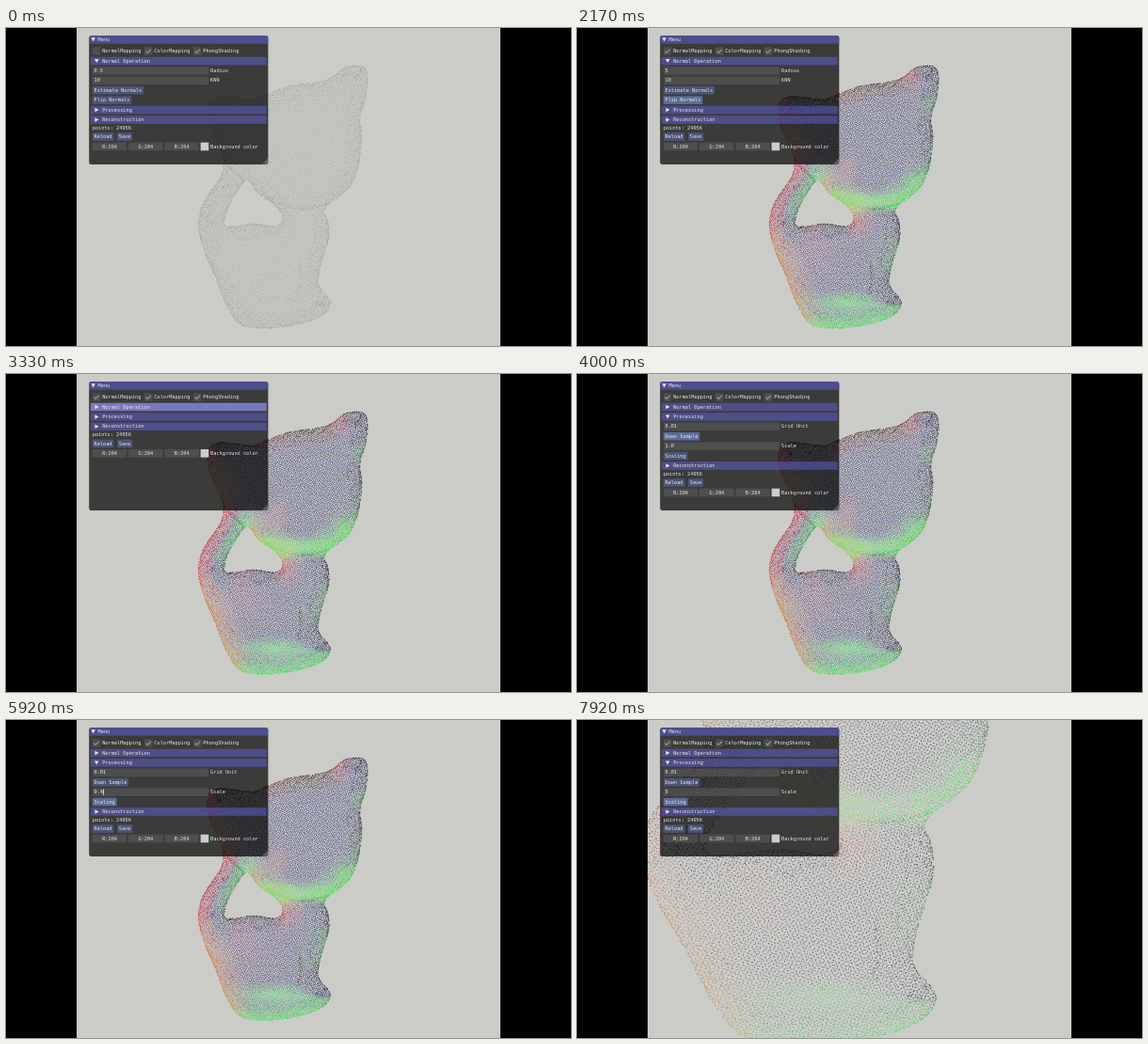
Animation, 600 px wide and 338 px high, one loop 8000 ms. Source, as an HTML page with a canvas:

```html
<!DOCTYPE html>
<html lang="en">
<head>
<meta charset="utf-8">
<title>Point cloud viewer</title>
<style>
html, body { margin: 0; width: 100%; height: 100%; overflow: hidden; background: #000; }
canvas { display: block; }
</style>
</head>
<body>
<canvas id="stage" width="600" height="338"></canvas>
<script>
const LOOP = 8000, WIDTH = 600, HEIGHT = 338;
const ctx = document.getElementById('stage').getContext('2d');

let seed = 7;
function random() {
  seed = (seed + 0x6D2B79F5) | 0;
  let v = Math.imul(seed ^ (seed >>> 15), 1 | seed);
  v = (v + Math.imul(v ^ (v >>> 7), 61 | v)) ^ v;
  return ((v ^ (v >>> 14)) >>> 0) / 4294967296;
}

// ---- Cat shape ----
const OUTLINE = [
  [384, 52], [380, 42], [371, 40], [358, 43], [345, 53], [326, 58], [300, 62], [278, 70], [262, 76],
  [244, 74], [224, 73], [215, 80], [214, 94], [219, 112], [227, 128], [231, 143], [228, 158], [217, 174],
  [208, 190], [204, 210], [210, 235], [222, 264], [232, 290], [245, 312], [264, 319], [300, 317],
  [331, 308], [344, 296], [342, 286], [333, 276], [332, 262], [338, 240], [343, 222], [342, 206],
  [338, 195], [343, 187], [356, 178], [368, 164], [375, 143], [378, 115], [376, 95], [382, 74]
];
const HOLE = [
  [256, 162], [245, 175], [236, 191], [232, 206], [237, 211], [264, 208], [284, 211], [293, 206],
  [292, 196], [282, 186], [268, 176]
];
// Inner contours and the share of dots kept along each
const CREASES = [
  [0.9, [[228, 138], [245, 156], [268, 177], [296, 190], [320, 193], [342, 188]]],
  [0.6, [[311, 250], [313, 264], [311, 282]]],
  [0.3, [[262, 292], [282, 288], [310, 291]]]
];
// Places where the front tilts: x, y, rx, ry, tilt right, tilt down
const BUMPS = [
  [312, 184, 46, 9, 0, 1], [364, 166, 14, 12, 0, 0.7], [286, 291, 32, 8, 0, 0.9],
  [287, 150, 11, 15, -0.5, 0.1], [252, 238, 28, 26, -0.3, 0], [312, 262, 5, 18, 0.8, 0],
  [282, 268, 20, 4, 0, -0.7], [296, 131, 18, 6, 0, -0.4], [318, 68, 45, 12, 0, -0.4]
];
const ROUNDING = 27;

// Catmull-Rom curve through the points, sampled evenly
function curve(pts, closed) {
  const n = pts.length, out = [];
  const get = i => closed ? pts[(i + n) % n] : pts[Math.max(0, Math.min(n - 1, i))];
  for (let i = 0; i < (closed ? n : n - 1); i++) {
    const [a, b, c, d] = [get(i - 1), get(i), get(i + 1), get(i + 2)];
    const steps = Math.ceil(Math.hypot(c[0] - b[0], c[1] - b[1]) / 0.6);
    for (let s = 0; s < steps; s++) {
      const t = s / steps;
      out.push([0, 1].map(k => b[k] + 0.5 * t * (c[k] - a[k] +
        t * (2 * a[k] - 5 * b[k] + 4 * c[k] - d[k] + t * (3 * (b[k] - c[k]) + d[k] - a[k])))));
    }
  }
  return out;
}

// The silhouette as a path and as rim points with outward normals
const shape = new Path2D(), rim = [];
[OUTLINE, HOLE].forEach((pts, hole) => {
  const edge = curve(pts, true), side = hole ? -1 : 1;
  edge.forEach(([x, y], i) => {
    const [x2, y2] = edge[(i + 1) % edge.length];
    const len = side * Math.hypot(x2 - x, y2 - y) || 1;
    i ? shape.lineTo(x, y) : shape.moveTo(x, y);
    rim.push({ x, y, nx: (y - y2) / len, ny: (x2 - x) / len });
  });
  shape.closePath();
});
const coarseRim = rim.filter((_, i) => i % 4 === 0);

// The surface faces outward at the rim and turns to the viewer further in
function surfaceNormal(x, y, back) {
  let best = Infinity, near;
  for (const p of coarseRim) {
    const d = (p.x - x) ** 2 + (p.y - y) ** 2;
    if (d < best) [best, near] = [d, p];
  }
  const tilt = Math.max(0, 1 - Math.sqrt(best) / ROUNDING);
  let nx = near.nx * tilt, ny = near.ny * tilt;
  for (const [bx, by, rx, ry, tx, ty] of BUMPS) {
    const w = Math.exp(-(((x - bx) / rx) ** 2) - ((y - by) / ry) ** 2);
    nx += tx * w;
    ny += ty * w;
  }
  const len = Math.max(1, Math.hypot(nx, ny));
  nx /= len;
  ny /= len;
  const nz = Math.sqrt(Math.max(0, 1 - nx * nx - ny * ny));
  return [nx, -ny, back ? -nz : nz];
}

const dots = [];
function addDot(x, y, back) {
  if (ctx.isPointInPath(shape, x, y, 'evenodd')) dots.push({ x, y, normal: surfaceNormal(x, y, back) });
}

// Front and back surfaces: two gently bent lattices
function addLayer(angle, back) {
  const gap = 1.85, c = Math.cos(angle), s = Math.sin(angle);
  for (let v = -190; v < 190; v += gap) {
    for (let u = -190; u < 190; u += gap) {
      const p = u + 4 * Math.sin(v / 23) + (random() - 0.5) * 0.7;
      const q = v + 4 * Math.sin(u / 27) + (random() - 0.5) * 0.7;
      addDot(295 + p * c - q * s, 180 + p * s + q * c, back);
    }
  }
}
addLayer(0.35, false);
addLayer(-0.5, true);

// Dots crowd where the surface turns away
for (const { x, y, nx, ny } of rim) {
  for (const back of [false, true]) {
    const inset = 16 * random() ** 2.4;
    addDot(x - nx * inset, y - ny * inset, back);
  }
}
for (const [share, pts] of CREASES) {
  for (const [x, y] of curve(pts, false)) {
    if (random() < share) addDot(x + (random() - 0.5) * 3, y - 4 * random() ** 2, false);
  }
}

function project(x, y, zoom) {
  const dx = x - 308, dy = y - 289;
  if (zoom < 1) return [308 + dx * zoom, 289 + dy * zoom];
  if (zoom > 1) return [310 + dx * (2.05 - 0.0027 * dx), 289 + dy * 1.87];
  return [x, y];
}

// facing: 1 outward, -1 inward
function normalColor(normal, facing, blue) {
  const [r, g, b] = normal.map(v => Math.max(0, v * facing));
  return `rgb(${25 + 185 * r},${25 + 215 * g},${32 + blue * b})`;
}

function renderCat({ facing = 0, color, zoom = 1, size = 0.68, alpha = 1, blue = 120 }) {
  const layer = document.createElement('canvas');
  layer.width = WIDTH;
  layer.height = HEIGHT;
  const g = layer.getContext('2d');
  g.globalAlpha = alpha;
  for (const dot of dots) {
    const [x, y] = project(dot.x, dot.y, zoom);
    g.fillStyle = facing ? normalColor(dot.normal, facing, blue) : color;
    g.fillRect(x - size / 2, y - size / 2, size, size);
  }
  return layer;
}

const cats = {
  plain: renderCat({ color: '#4c4c48', alpha: 0.26 }),
  black: renderCat({ color: '#1c1c1c' }),
  inward: renderCat({ facing: -1 }),
  outward: renderCat({ facing: 1 }),
  small: renderCat({ facing: -1, zoom: 0.4, blue: 165 }),
  large: renderCat({ facing: -1, zoom: 2, size: 0.85, alpha: 0.75, blue: 40 })
};

// ---- Menu, in its own units ----
const SCALE = 0.4525, CHAR = 7, FRAME = 19;
const TEXT = '#e6e6e6', FRAME_BG = 'rgba(110,110,110,.39)';
const BUTTON = ['rgba(89,102,156,.62)', 'rgba(102,122,181,.79)', 'rgb(117,138,204)'];
const HEADER = ['rgba(102,102,230,.45)', 'rgba(115,115,230,.8)', 'rgba(135,135,222,.8)'];

function rect(x, y, w, h, color) {
  ctx.fillStyle = color;
  ctx.fillRect(x, y, w, h);
}

function text(str, x, y) {
  ctx.fillStyle = TEXT;
  ctx.fillText(str, x, y + 10);
}

function polygon(color, ...pts) {
  ctx.fillStyle = color;
  ctx.beginPath();
  pts.forEach(p => ctx.lineTo(...p));
  ctx.fill();
}

function arrow(x, y, open) {
  if (open) polygon(TEXT, [x, y + 5], [x + 10, y + 5], [x + 5, y + 14]);
  else polygon(TEXT, [x + 1, y + 4.5], [x + 10, y + 9.5], [x + 1, y + 14.5]);
}

function shade(colors, name, ui) {
  return colors[ui.hover !== name ? 0 : ui.pressed ? 2 : 1];
}

function checkbox(label, x, checked, ui) {
  const y = 27;
  rect(x, y, FRAME, FRAME, ui.hover === label ? 'rgba(120,120,176,.5)' : FRAME_BG);
  if (checked) {
    ctx.strokeStyle = 'rgba(230,230,230,.5)';
    ctx.lineWidth = 2.6;
    ctx.beginPath();
    ctx.moveTo(x + 3.6, y + 9.5);
    ctx.lineTo(x + 7.5, y + 13.4);
    ctx.lineTo(x + 15.3, y + 5.6);
    ctx.stroke();
  }
  text(label, x + 23, y);
}

function header(label, y, open, ui) {
  rect(4, y, 413, FRAME, shade(HEADER, label, ui));
  arrow(13, y, open);
  text(label, 31, y);
}

function button(label, x, y, ui) {
  rect(x, y, label.length * CHAR + 8, FRAME, shade(BUTTON, label, ui));
  text(label, x + 4, y);
}

function field(label, y, value, ui, mode) {
  rect(8, y, 273, FRAME, ui.hover === label ? 'rgba(120,120,176,.4)' : FRAME_BG);
  const end = 12 + value.length * CHAR;
  if (mode === 'selected') rect(12, y + 2, end - 12, 15, 'rgba(0,0,255,.5)');
  text(value, 12, y);
  if (mode === 'caret') rect(end, y + 3, 2, 13, TEXT);
  text(label, 285, y);
}

function drawMenu(ui) {
  ctx.save();
  ctx.translate(88.1, 8.1);
  ctx.scale(SCALE, SCALE);
  ctx.font = '11.63px "DejaVu Sans Mono", monospace';
  ctx.textBaseline = 'middle';

  ctx.beginPath();
  ctx.roundRect(0, 0, 421, 303, 7);
  ctx.clip();
  rect(0, 0, 421, 303, 'rgba(0,0,0,.71)');
  rect(0, 0, 421, FRAME, 'rgba(82,82,161,.82)');
  arrow(5, 0, true);
  text('Menu', 21, 0);
  polygon('rgba(255,255,255,.22)', [420, 288], [420, 302], [406, 302]);

  checkbox('NormalMapping', 8, ui.mapped, ui);
  checkbox('ColorMapping', 130, true, ui);
  checkbox('PhongShading', 245, true, ui);

  header('Normal Operation', 50, ui.section === 'normal', ui);
  if (ui.section === 'normal') {
    field('Radius', 73, ui.radius, ui, ui.radiusMode);
    field('KNN', 96, '10', ui);
    button('Estimate Normals', 8, 119, ui);
    button('Flip Normals', 8, 142, ui);
    header('Processing', 165, false, ui);
  } else if (ui.section === 'processing') {
    header('Processing', 73, true, ui);
    field('Grid Unit', 96, '0.01', ui);
    button('Down Sample', 8, 119, ui);
    field('Scale', 142, ui.scale, ui, ui.scaleMode);
    button('Scaling', 8, 165, ui);
  } else {
    header('Processing', 73, false, ui);
  }

  // Closing both sections moves the rest up
  ctx.translate(0, ui.section ? 0 : -92);
  header('Reconstruction', 188, false, ui);
  text('points: 24956', 8, 207);
  button('Reload', 8, 228, ui);
  button('Save', 66, 228, ui);
  ['R', 'G', 'B'].forEach((channel, i) => {
    const x = 8 + i * 84.7;
    rect(x, 251, 80.7, FRAME, FRAME_BG);
    text(channel + ':204', x + 23, 251);
  });
  rect(262, 251, FRAME, FRAME, '#cccccc');
  text('Background color', 285, 251);
  ctx.restore();
}

// ---- Timeline: pairs of start time and value ----
function at(t, ...steps) {
  let value;
  for (let i = 0; i < steps.length && steps[i] <= t; i += 2) value = steps[i + 1];
  return value;
}

const CLICKS = [1080, 1920, 2500, 3000, 3290, 3670, 4250, 6000, 7460];

function uiAt(t) {
  return {
    hover: at(t, 0, '', 830, 'NormalMapping', 1420, '', 1670, 'Radius', 1750, 'KNN',
      1830, 'Estimate Normals', 2080, 'Flip Normals', 3170, 'Normal Operation', 3500, 'Processing',
      3830, 'Down Sample', 4670, '', 5670, 'Scaling'),
    pressed: CLICKS.some(c => t >= c && t < c + 80),
    mapped: t >= 1080,
    section: at(t, 0, 'normal', 3330, '', 3710, 'processing'),
    radius: at(t, 0, '0.5', 330, '5'),
    radiusMode: at(t, 0, '', 250, 'selected', 330, 'caret', 670, ''),
    scale: at(t, 0, '1.0', 5080, '0.', 5420, '0.4', 7170, '5'),
    scaleMode: at(t, 0, '', 5000, 'selected', 5080, 'caret', 6000, '', 6830, 'selected', 7170, 'caret', 7460, ''),
    cat: at(t, 0, 'plain', 1080, 'black', 1920, 'inward', 2500, 'outward', 3000, 'inward',
      6000, 'small', 7500, 'large')
  };
}

function draw() {
  const ui = uiAt(performance.now() % LOOP);
  rect(0, 0, WIDTH, HEIGHT, '#000');
  rect(75, 0, 450, HEIGHT, '#cbccc8');
  ctx.drawImage(cats[ui.cat], 75, 0, 450, HEIGHT, 75, 0, 450, HEIGHT);
  drawMenu(ui);
  requestAnimationFrame(draw);
}
draw();
</script>
</body>
</html>
```
